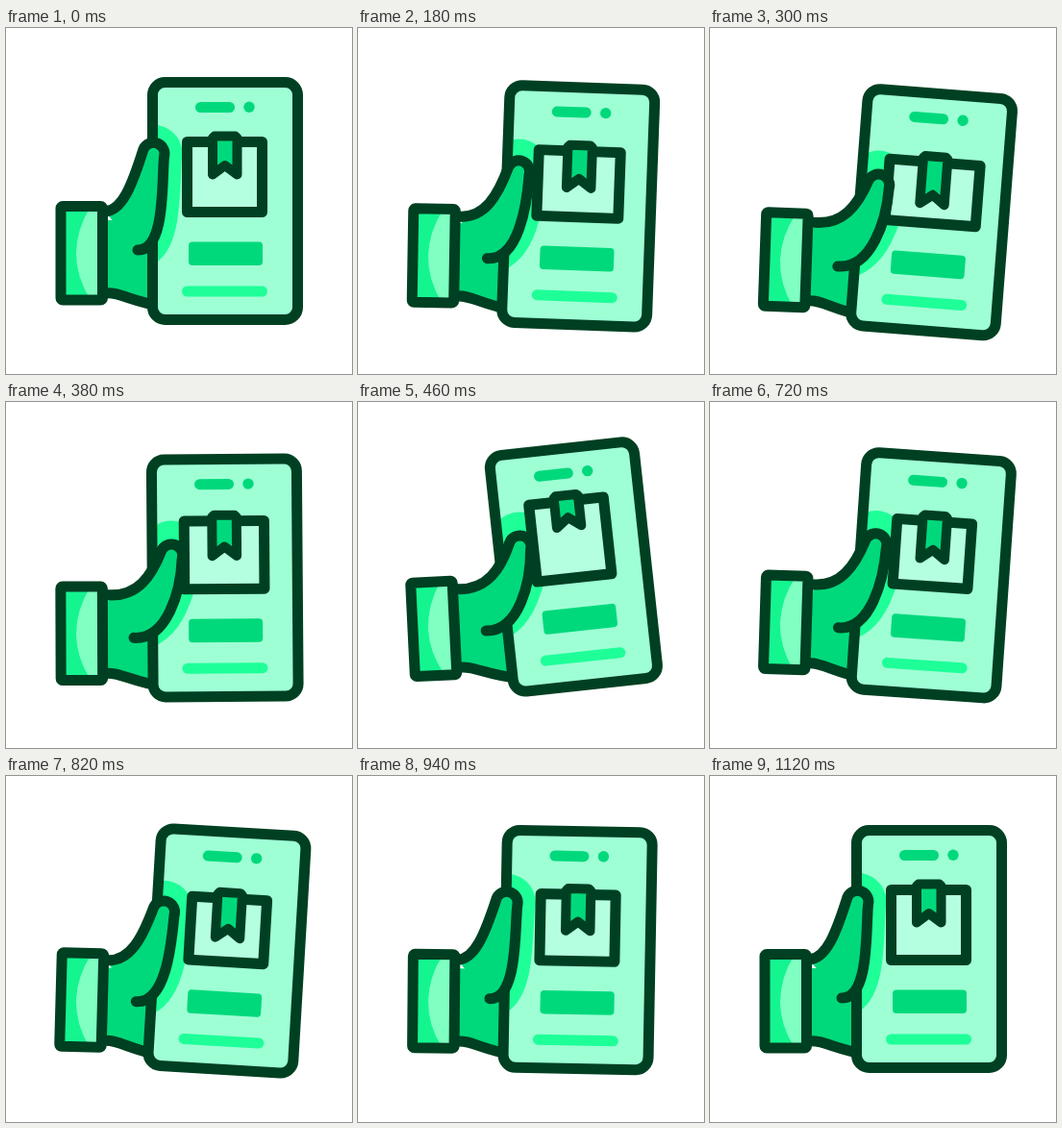
Recreate the animation shown at these times as an HTML page. Size 360x360 px, loop 1.27 s.

```html
<!DOCTYPE html>
<html lang="en">
<head>
<meta charset="utf-8">
<title>Hand holding a phone with a parcel</title>
<style>
  html, body { margin: 0; height: 100%; overflow: hidden; background: #fff; }
  svg { display: block; width: 100vw; height: 100vh; }
  .line { stroke: #004022; stroke-width: 11; stroke-linecap: round; stroke-linejoin: round; }
  .pale { fill: #9effd5; }
  .mid { fill: #00d97b; }
  .bright { fill: #1eff98; }
  .none { fill: none; }
</style>
</head>
<body>
<svg viewBox="0 0 360 360">
  <clipPath id="screen">
    <rect class="phone" x="152.5" y="56.5" width="151" height="247" rx="13"/>
  </clipPath>

  <g class="hand">
    <path class="mid" d="M103 200V276C118 274 130 285 165 290V200Z"/>
    <path class="none line" d="M103 276C118 274 130 285 165 290"/>
  </g>

  <rect class="phone pale" x="152.5" y="56.5" width="151" height="247" rx="13"/>
  <g clip-path="url(#screen)">
    <g class="hand">
      <path id="shade" class="thumb bright" stroke="#1eff98" stroke-width="37" stroke-linecap="round" stroke-linejoin="round"/>
    </g>
  </g>
  <g class="phone">
    <rect class="none line" x="152.5" y="56.5" width="151" height="247" rx="13"/>
    <rect class="mid" x="197" y="77" width="41" height="11" rx="5.5"/>
    <circle class="mid" cx="253" cy="82.3" r="5.7"/>
    <rect class="mid" x="190" y="222.5" width="77" height="24.5" rx="4"/>
    <rect class="bright" x="183" y="268.5" width="89" height="11" rx="5.5"/>
    <path id="box" class="line" fill="#b4ffdf"/>
    <path id="ribbon" class="mid line" style="stroke-width:10"/>
  </g>

  <g class="hand">
    <path class="thumb mid line"/>
    <rect fill="#14f590" x="57" y="185.5" width="43.5" height="97.5"/>
    <path fill="#80ffc2" d="M88 185.5Q58 235 88 283H100.5V185.5Z"/>
    <rect class="none line" x="57" y="185.5" width="43.5" height="97.5" rx="2"/>
  </g>
</svg>
<script>
const LOOP = 1270, STEP = 20, START = 100, FIRST = 275;

const set = (s, name, value) =>
  document.querySelectorAll(s).forEach(el => el.setAttribute(name, value));

// Eased 0 to 1 between two times.
function ramp(t, from, to) {
  const p = Math.min(1, Math.max(0, (t - from) / (to - from)));
  return (1 - Math.cos(Math.PI * p)) / 2;
}

// Swings to each peak, one per beat, then settles at zero a little slower.
function sway(t, beat, ...peaks) {
  let value = peaks[0] * ramp(t, START, FIRST), at = FIRST;
  peaks.forEach((peak, i) => {
    const last = i === peaks.length - 1;
    const next = at + beat * (last ? 1.35 : 1);
    value += ((last ? 0 : peaks[i + 1]) - peak) * ramp(t, at, next);
    at = next;
  });
  return value;
}

// The tip moves right and down as the thumb bends; the rest follows.
function thumbPath(b) {
  const x = 153.5 + 19 * b, y = 130 + 22.5 * b;
  return `M103 ${191 + 3 * b}
    C${121 + 16 * b} ${190 + 8 * b} ${131 + 21 * b} ${164 + 10 * b} ${x - 10.5} ${y - 4}
    A11.5 11.5 0 0 1 ${x + 11} ${y + 4}
    C${162 + 20 * b} ${160 + 30 * b} ${166 + 2 * b} ${232 + 9 * b} ${137 - 4 * b} ${231 + 8 * b}`;
}

function draw(t) {
  const tilt = sway(t, 230, 4.8, -7.3, 4.1);
  const lift = sway(t, 250, 12.3, -12.5, 2);
  const squash = sway(t, 250, 10, -10.5, 7.3);
  const widen = 17 * (ramp(t, START, 280) - ramp(t, 280, 440));
  const arm = 7 * (ramp(t, START, 290) - 2 * ramp(t, 350, 610) + ramp(t, 610, 900));
  const bend = ramp(t, START, 235) - ramp(t, 640, 970);

  set('.phone', 'transform', `translate(${tilt * 0.58} ${lift}) rotate(${tilt} 228 180)`);
  set('.hand', 'transform', `translate(0 ${arm}) rotate(${tilt * 0.45} 78.5 234)`);
  set('.thumb', 'd', thumbPath(bend));
  set('#shade', 'transform', `translate(0 ${-6 * bend})`);

  const half = 39 + widen / 2, top = 118.5 + squash;
  set('#box', 'd', `M${227.5 - half} ${top}H${227.5 + half}V191.5H${227.5 - half}Z`);

  const head = top - 6, tail = 152.5 + 2 * squash;
  set('#ribbon', 'd', `M215 ${tail}V${head + 2}l2 -2H238.5l2 2V${tail}L227.8 ${tail - 9.5}Z`);
}

const start = performance.now();
function tick() {
  const t = (performance.now() - start) % LOOP;
  draw(Math.floor(t / STEP) * STEP);
  requestAnimationFrame(tick);
}
tick();
</script>
</body>
</html>
```
